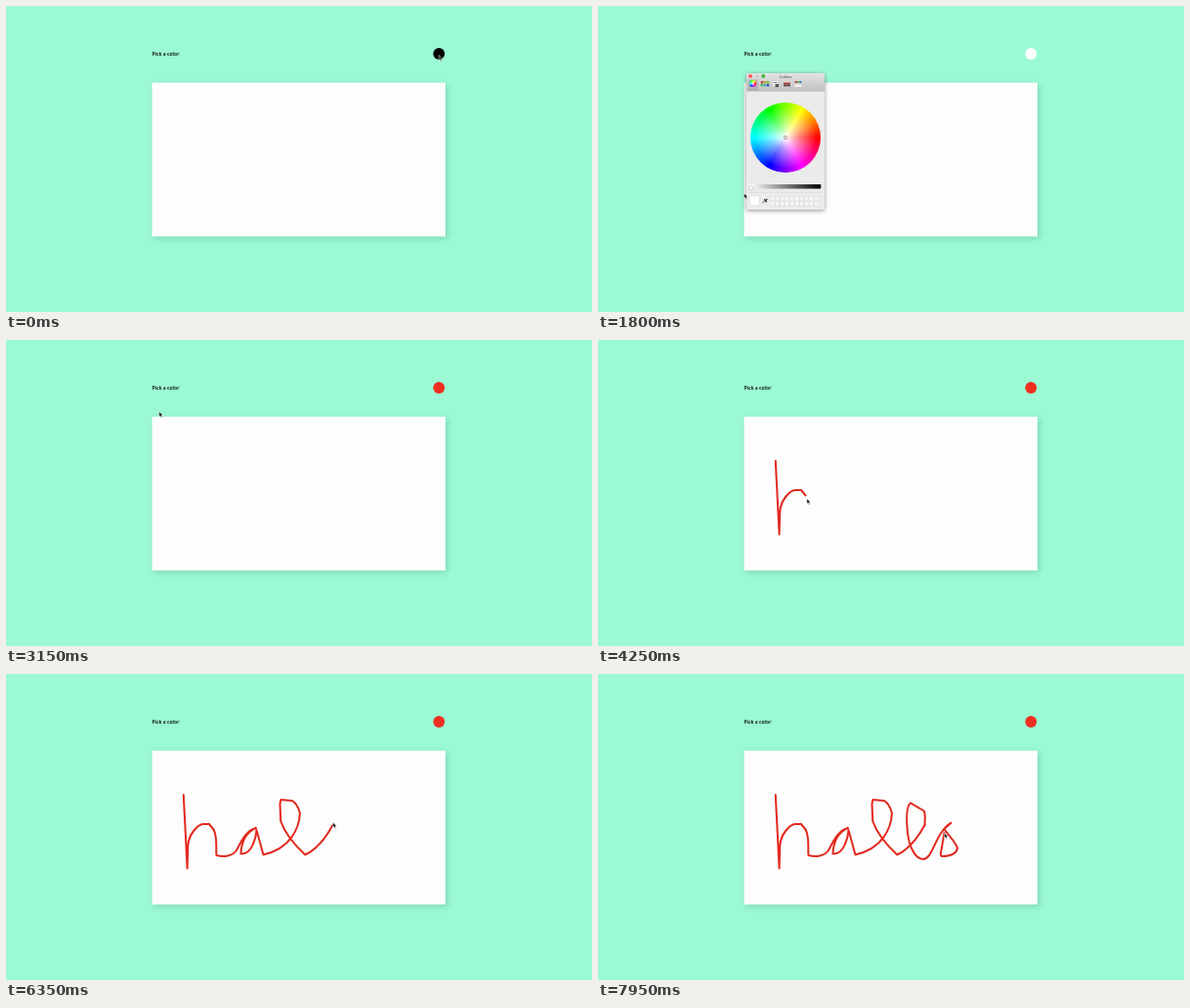
Animation of 600x314 px, one loop 8 s. Source, as an HTML page:

```html
<!DOCTYPE html>
<html lang="en">
<head>
<meta charset="utf-8">
<title>Pick a color</title>
<style>
html, body { margin: 0; width: 100%; height: 100%; overflow: hidden; background: #9bf9d4; }
svg { display: block; width: 100vw; height: 100vh; }
text { font-family: "Open Sans", "Noto Sans", sans-serif; }
.card { filter: drop-shadow(2.5px 2.5px 3px rgba(0, 60, 40, .18)); }
.window { filter: drop-shadow(0 1px 2px rgba(0, 0, 0, .42)); }
.wheel {
  width: 72px; height: 72px; border-radius: 50%;
  background:
    radial-gradient(circle, #fff 0, rgba(255, 255, 255, .55) 24%, transparent 62%),
    conic-gradient(from 90deg, #f00, #f0f, #00f, #0ff, #0f0, #ff0, #f00);
}
.wheel.small { width: 7.4px; height: 7.4px; }
</style>
</head>
<body>
<svg viewBox="0 0 600 314" xmlns="http://www.w3.org/2000/svg">
  <defs>
    <linearGradient id="bar" x2="0" y2="1">
      <stop stop-color="#e4e2e4"/><stop offset="1" stop-color="#c2c1c2"/>
    </linearGradient>
    <linearGradient id="ramp">
      <stop id="rampStart"/><stop offset="1" stop-color="#000"/>
    </linearGradient>
  </defs>
  <text x="149.4" y="51.1" font-size="5.1" font-weight="600">Pick a color</text>
  <circle id="dot" cx="443.3" cy="49" r="5.9"/>
  <rect class="card" x="149.5" y="78.7" width="300.5" height="157.8" fill="#fdfdfd"/>

  <g id="ink" fill="none" stroke="#e2291f" stroke-width="2" stroke-linecap="round" stroke-linejoin="round">
    <path d="M181.8 124L185.6 199.5 186.3 176C187 164 197 154 202 154H208L212.5 159.5"/>
    <path d="M212.5 159.5C217 168 214.6 180 215.5 186C222 188 231 187.5 236 181C241 172 244 162 256 158
      C245 163 241 173 240.4 184.5C252 186 256 167 256.5 160L263.5 185.5C292 179 300 158 301 143
      C299 134 294 130 292.5 130L281.5 129 280.5 133 281.3 151C285 162 294 174 306.3 185.5
      C318 180 327 169 334.5 155"/>
    <path d="M334.5 155C335 148 335 143 333.8 140.5L320 132.3C315 136 316 153 317 163
      C319 180 326 190 333 190C343 190 345 163 361.5 152.7L354.5 159C359 166 367 173 368 179
      C367 184 362 187 352 187Q350 186 351.5 181L354.5 163"/>
  </g>

  <g id="picker">
    <rect class="window" x="152" y="69" width="80" height="140" rx="1.5" fill="#ebebeb"/>
    <path d="M152 87.3V70.5q0-1.5 1.5-1.5h77q1.5 0 1.5 1.5v16.8z" fill="url(#bar)"/>
    <path d="M152 87.4h80" stroke="#aaa" stroke-width=".5"/>
    <circle cx="156" cy="72" r="2" fill="#fc5b57"/>
    <circle cx="162.7" cy="72" r="2" fill="#d0ced0"/>
    <circle cx="169.2" cy="72" r="2" fill="#43b648"/>
    <text x="192" y="73.6" font-size="4.3" text-anchor="middle" fill="#333">Colors</text>

    <rect x="153.4" y="75.4" width="10.8" height="11.6" fill="#aaa" opacity=".7"/>
    <foreignObject x="155" y="76" width="8" height="8"><div class="wheel small"></div></foreignObject>
    <g id="tools">
      <path d="M179.4 77h4.2v5.5h-4.2z" fill="#eee"/>
      <path d="M180 78h3v.8h-3zM181.5 80H185v3.2h-3.5z" fill="#555"/>
      <path d="M190 77h7v6h-7z" fill="#e8d6cc"/>
      <path d="M190 78.6h7v2h-7z" fill="#a63a30"/>
      <path d="M190 80.8h7v1.6h-7z" fill="#444"/>
      <path d="M201.6 80.6h6.8V83h-6.8z" fill="#f4f4f4"/>
    </g>

    <foreignObject x="156" y="99" width="72" height="72"><div class="wheel"></div></foreignObject>
    <circle id="shade" cx="192" cy="135" r="36.2"/>
    <circle id="marker" r="1.7" fill="none" stroke="#8a6262" stroke-width=".6"/>

    <rect x="155.5" y="183" width="72.8" height="4.4" rx=".8" fill="url(#ramp)"/>
    <path id="knob" d="M-1.8 3.2V.8L0-1 1.8.8V3.2z" fill="#fff" stroke="#777" stroke-width=".3"/>
    <path d="M154 191.4h76" stroke="#d4d4d4" stroke-width=".5"/>
    <rect id="swatch" x="155.5" y="195" width="9.7" height="9.5" rx="1" stroke="#ccc" stroke-width=".4"/>
    <path d="M168.3 202.3l3-3" stroke="#888" stroke-width="1.1"/>
    <path d="M170.5 198.7l2 2M171.3 199.8l1.6-1.6" stroke="#333" stroke-width="1.3" stroke-linecap="round"/>
    <g id="wells" fill="#f6f6f6" stroke="#d2d2d2" stroke-width=".4"></g>
  </g>

  <path id="cursor" d="M0 0V5.4L1.3 4.3 2.2 6.3 3.2 5.9 2.3 3.9H4z" fill="#111" stroke="#fff" stroke-width=".5"/>
</svg>
<script>
const LOOP = 8000, STEP = 50, LEAD = 20;
const OPEN = 400, SLIDE = 1300, SLID = 1750, TINT = 2100, CLOSE = 3100, DRAW = 3600;
const WHEEL = { x: 192, y: 135, r: 36 };
const RED = [240, 47, 33];

const $ = id => document.getElementById(id);
const clamp = (v, lo = 0, hi = 1) => Math.max(lo, Math.min(hi, v));
const mix = (a, b, k) => a + (b - a) * k;
const smooth = k => k * k * (3 - 2 * k);
const rgb = c => `rgb(${c.map(Math.round)})`;
const move = (id, x, y) => $(id).setAttribute('transform', `translate(${x} ${y})`);

// Rows of small squares for the toolbar icons and the colour wells
const grid = (cols, rows, x, y, pitch, size, fill = () => '') =>
  Array.from({ length: cols * rows }, (_, i) =>
    `<rect x="${x + i % cols * pitch}" y="${y + Math.floor(i / cols) * pitch}" width="${size}" height="${size}"${fill(i)}/>`
  ).join('');
const hues = (from, turn) => i => ` fill="hsl(${from + i * turn} 55% 48%)"`;
$('tools').innerHTML += grid(3, 2, 166.7, 77, 3, 2.5, hues(5, 45)) + grid(3, 1, 201.6, 77, 2.4, 2, hues(0, 105));
$('wells').innerHTML = grid(10, 2, 176.5, 195.8, 5, 4.2);

// Pen strokes follow one another, each ending at its own time
const ends = [4250, 6350, 7950];
const strokes = [...$('ink').children].map((path, i) => ({
  path, len: path.getTotalLength(), from: i ? ends[i - 1] : DRAW, to: ends[i]
}));
const drawn = (s, t) => s.len * clamp((t - s.from) / (s.to - s.from));

// Mouse stops: arrival time and place
const stops = [
  [350, 443.2, 50.5],
  [1050, 193.8, 164],
  [SLIDE, 226, 185],
  [SLID, 147, 195.5],
  [TINT, WHEEL.x, WHEEL.y],
  [2450, 231, 125.3],
  [CLOSE, 156, 72],
  [DRAW, 181.8, 124]
];

function mouse(t) {
  if (t >= DRAW) {
    const s = strokes.find(s => t + LEAD < s.to) || strokes[strokes.length - 1];
    return s.path.getPointAtLength(drawn(s, t + LEAD));
  }
  const next = Math.max(1, stops.findIndex(s => t < s[0]));
  const a = stops[next - 1], b = stops[next];
  const k = smooth(clamp((t - a[0]) / (b[0] - a[0])));
  return { x: mix(a[1], b[1], k), y: mix(a[2], b[2], k) };
}

function render(t) {
  const { x, y } = mouse(t);
  move('cursor', x, y);

  // Brightness follows the slider
  const slide = t < SLIDE ? 226 : t < SLID ? clamp(x, 157, 226) : 157;
  const light = (226 - slide) / 69;
  move('knob', slide, 185);
  $('shade').setAttribute('opacity', 1 - light);

  // Saturation follows the marker on its way to the rim
  const drag = mouse(clamp(t, TINT, 2450));
  const dx = drag.x - WHEEL.x, dy = drag.y - WHEEL.y;
  const dist = Math.hypot(dx, dy);
  const fit = dist > WHEEL.r ? WHEEL.r / dist : 1;
  move('marker', WHEEL.x + dx * fit, WHEEL.y + dy * fit);

  const base = RED.map(c => mix(255, c, clamp(dist / WHEEL.r)));
  const color = rgb(base.map(c => c * light));
  for (const id of ['dot', 'swatch']) $(id).setAttribute('fill', color);
  $('rampStart').setAttribute('stop-color', rgb(base));
  $('picker').style.display = t >= OPEN && t < CLOSE ? '' : 'none';

  for (const s of strokes) {
    s.path.style.display = t > s.from ? '' : 'none';
    s.path.setAttribute('stroke-dasharray', `${drawn(s, t)} ${s.len + 9}`);
  }
}

const start = performance.now();
function frame() {
  const t = (performance.now() - start) % LOOP;
  render(Math.floor(t / STEP) * STEP);
  requestAnimationFrame(frame);
}
frame();
</script>
</body>
</html>
```
